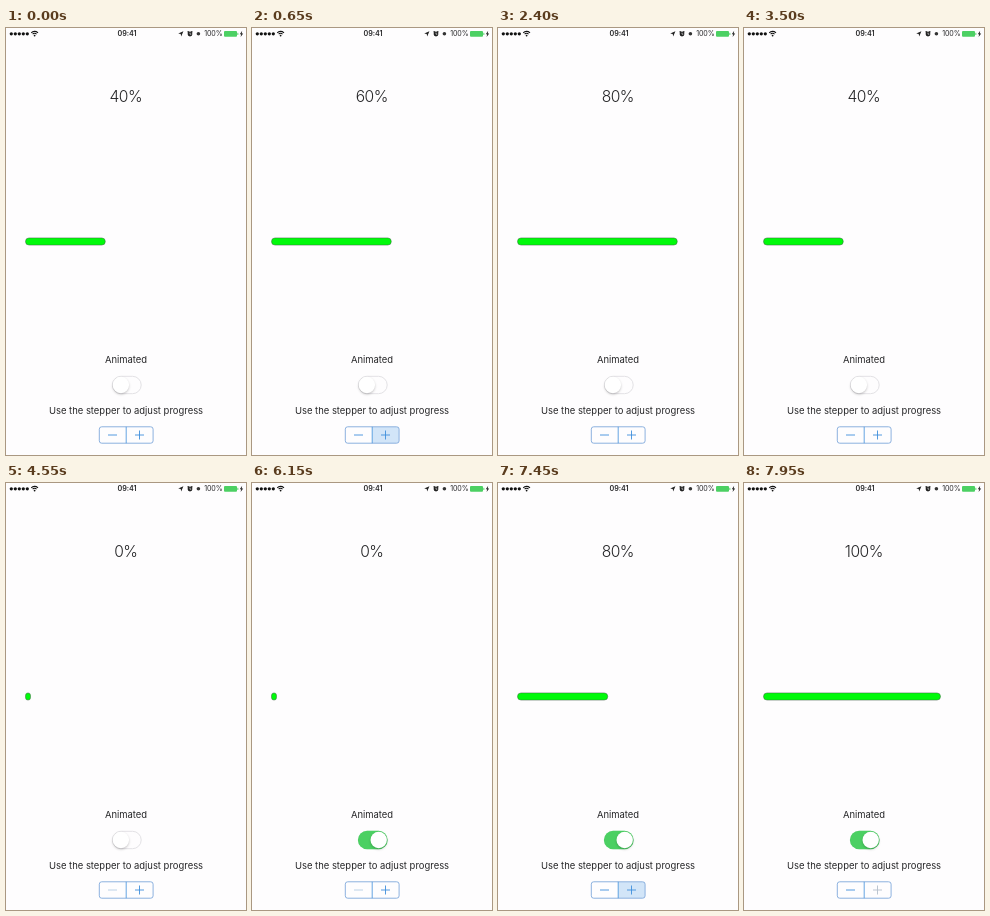
An HTML page with a canvas that plays this animation: 240 px wide and 427 px high, repeating every 8000 ms.

```html
<!DOCTYPE html>
<html lang="en">
<head>
<meta charset="utf-8">
<title>Progress bar demo</title>
<style>
  html, body { margin: 0; width: 100%; height: 100%; overflow: hidden; background: #fefdfe; }
  canvas { display: block; width: 240px; height: 427px; }
</style>
</head>
<body>
<canvas id="stage"></canvas>
<script>
const W = 240, H = 427, LOOP = 8000;
const BLUE = '#3f8fdc', FRAME = '#7fa9dc', GREEN = '#4cd063', INK = '#262628', PAPER = '#fefdfe';
const SWITCH_DOWN = 5200, SWITCH_UP = 5400;
const VALUE_LAG = 50, PRESS_HOLD = 200, GLIDE = 600;

// Stepper taps: time, direction
const taps = [
  [50, 1], [650, 1], [1400, 1],
  [2000, -1], [2600, -1], [2900, -1], [3750, -1], [4350, -1],
  [6450, 1], [6725, 1], [7200, 1], [7400, 1], [7600, 1]
];

const canvas = document.getElementById('stage');
const scale = window.devicePixelRatio || 1;
canvas.width = W * scale;
canvas.height = H * scale;
const ctx = canvas.getContext('2d');

const clamp = x => Math.max(0, Math.min(1, x));
const easeInOut = x => x * x * (3 - 2 * x);
const mix = (a, b, k) => a + (b - a) * k;

function stateAt(t) {
  let steps = 2, bar = 2, pressed = 0;
  for (const [time, dir] of taps) {
    const age = t - time;
    if (age < 0) break;
    if (age < PRESS_HOLD) pressed = dir;
    const sinceChange = age - VALUE_LAG;
    if (sinceChange < 0) continue;
    steps += dir;
    bar += dir * (time > SWITCH_UP ? easeInOut(clamp(sinceChange / GLIDE)) : 1);
  }
  return { steps, bar: bar / 5, pressed };
}

function text(str, x, y, size, weight, { align = 'center', spacing = 0 } = {}) {
  ctx.font = `${weight} ${size}px Inter, Roboto, sans-serif`;
  ctx.letterSpacing = `${spacing}px`;
  ctx.textAlign = align;
  ctx.fillStyle = INK;
  ctx.fillText(str, x, y);
}

function disc(x, y, r, color) {
  ctx.fillStyle = color;
  ctx.beginPath();
  ctx.arc(x, y, r, 0, Math.PI * 2);
  ctx.fill();
}

function pill(x, y, w, h, r) {
  ctx.beginPath();
  ctx.roundRect(x, y, w, h, Math.min(r, w / 2, h / 2));
}

function polygon(points, color) {
  ctx.fillStyle = color;
  ctx.beginPath();
  points.forEach(([x, y]) => ctx.lineTo(x, y));
  ctx.fill();
}

function line(x1, y1, x2, y2, color, width = 1) {
  ctx.strokeStyle = color;
  ctx.lineWidth = width;
  ctx.beginPath();
  ctx.moveTo(x1, y1);
  ctx.lineTo(x2, y2);
  ctx.stroke();
}

function drawStatusBar() {
  for (let i = 0; i < 5; i++) disc(5.3 + i * 4, 5.8, 1.65, '#111');

  ctx.strokeStyle = '#111';
  ctx.lineWidth = 1.1;
  for (const r of [2.7, 4.6]) {
    ctx.beginPath();
    ctx.arc(28.6, 8, r, -Math.PI * 0.76, -Math.PI * 0.24);
    ctx.stroke();
  }
  disc(28.6, 7.6, 0.9, '#111');

  text('09:41', 121, 8.4, 7.2, 600);

  polygon([[177.4, 3.2], [175.2, 8.6], [174.7, 6], [172.2, 5.6]], '#222');

  disc(184, 6, 2.4, '#222');
  disc(182.2, 3.9, 0.8, '#222');
  disc(185.8, 3.9, 0.8, '#222');
  line(184, 4.6, 184, 6.2, '#fff', 0.6);
  line(184, 6.2, 185.3, 6.2, '#fff', 0.6);

  disc(192.4, 5.8, 1.8, '#333');
  text('100%', 198.2, 8.4, 7.1, 400, { align: 'left', spacing: -0.1 });

  pill(218, 3, 13, 5.8, 1);
  ctx.fillStyle = GREEN;
  ctx.fill();
  ctx.fillRect(231.4, 4.8, 0.9, 2.2);
  polygon([[236.2, 2.8], [233.8, 6.2], [235.2, 6.2], [234.6, 9], [237.2, 5.4], [235.7, 5.4]], '#222');
}

function drawBar(progress) {
  pill(19.5, 209.9, Math.max(5, progress * 200 - 0.2), 7.2, 3.6);
  ctx.fillStyle = '#00fa0a';
  ctx.fill();
  ctx.strokeStyle = 'rgba(60,90,66,0.8)';
  ctx.lineWidth = 0.6;
  ctx.stroke();
}

function drawSwitch(t) {
  const on = easeInOut(clamp((t - SWITCH_UP) / 300));
  const stretch = 3 * (clamp((t - SWITCH_DOWN) / 150) - clamp((t - SWITCH_UP - 100) / 200));
  const knobW = 16.4 + stretch;

  pill(106.4, 348.3, 28.8, 17.4, 9);
  ctx.fillStyle = PAPER;
  ctx.fill();
  ctx.strokeStyle = '#e3e2e5';
  ctx.lineWidth = 1;
  ctx.stroke();

  ctx.globalAlpha = on;
  pill(105.9, 347.8, 29.8, 18.4, 9.2);
  ctx.fillStyle = GREEN;
  ctx.fill();
  ctx.globalAlpha = 1;

  ctx.save();
  ctx.shadowColor = 'rgba(0,0,0,0.22)';
  ctx.shadowBlur = 2.5 * scale;
  ctx.shadowOffsetY = 1.3 * scale;
  pill(mix(106.7, 134.9 - knobW, on), 348.8, knobW, 16.4, 8.2);
  ctx.fillStyle = '#fff';
  ctx.fill();
  ctx.restore();
}

function drawStepper({ steps, pressed }) {
  const x = 93.3, y = 398.8, w = 53.8, h = 16.4, mid = 120.2;
  if (pressed) {
    ctx.save();
    pill(x, y, w, h, 2.4);
    ctx.clip();
    ctx.fillStyle = '#d2e5f8';
    ctx.fillRect(pressed > 0 ? mid : x, y, w / 2, h);
    ctx.restore();
  }
  pill(x, y, w, h, 2.4);
  ctx.strokeStyle = FRAME;
  ctx.lineWidth = 0.9;
  ctx.stroke();
  line(mid, y, mid, y + h, BLUE, 0.8);

  const minus = steps <= 0 ? '#b4cde4' : BLUE;
  const plus = steps >= 5 ? '#b4bfcb' : BLUE;
  line(102, 407, 111, 407, minus, 0.9);
  line(129, 407, 138, 407, plus, 0.9);
  line(133.5, 402.5, 133.5, 411.5, plus, 0.9);
}

function draw(t) {
  const state = stateAt(t);
  ctx.setTransform(scale, 0, 0, scale, 0, 0);
  ctx.fillStyle = PAPER;
  ctx.fillRect(0, 0, W, H);
  drawStatusBar();
  text(`${state.steps * 20}%`, 119.8, 74.2, 15.6, 300, { spacing: -0.5 });
  drawBar(state.bar);
  text('Animated', 120, 335.2, 9.45, 400);
  drawSwitch(t);
  text('Use the stepper to adjust progress', 120, 385.7, 9.45, 400);
  drawStepper(state);
}

const start = performance.now();
function tick() {
  draw((performance.now() - start) % LOOP);
  requestAnimationFrame(tick);
}
tick();
</script>
</body>
</html>
```
